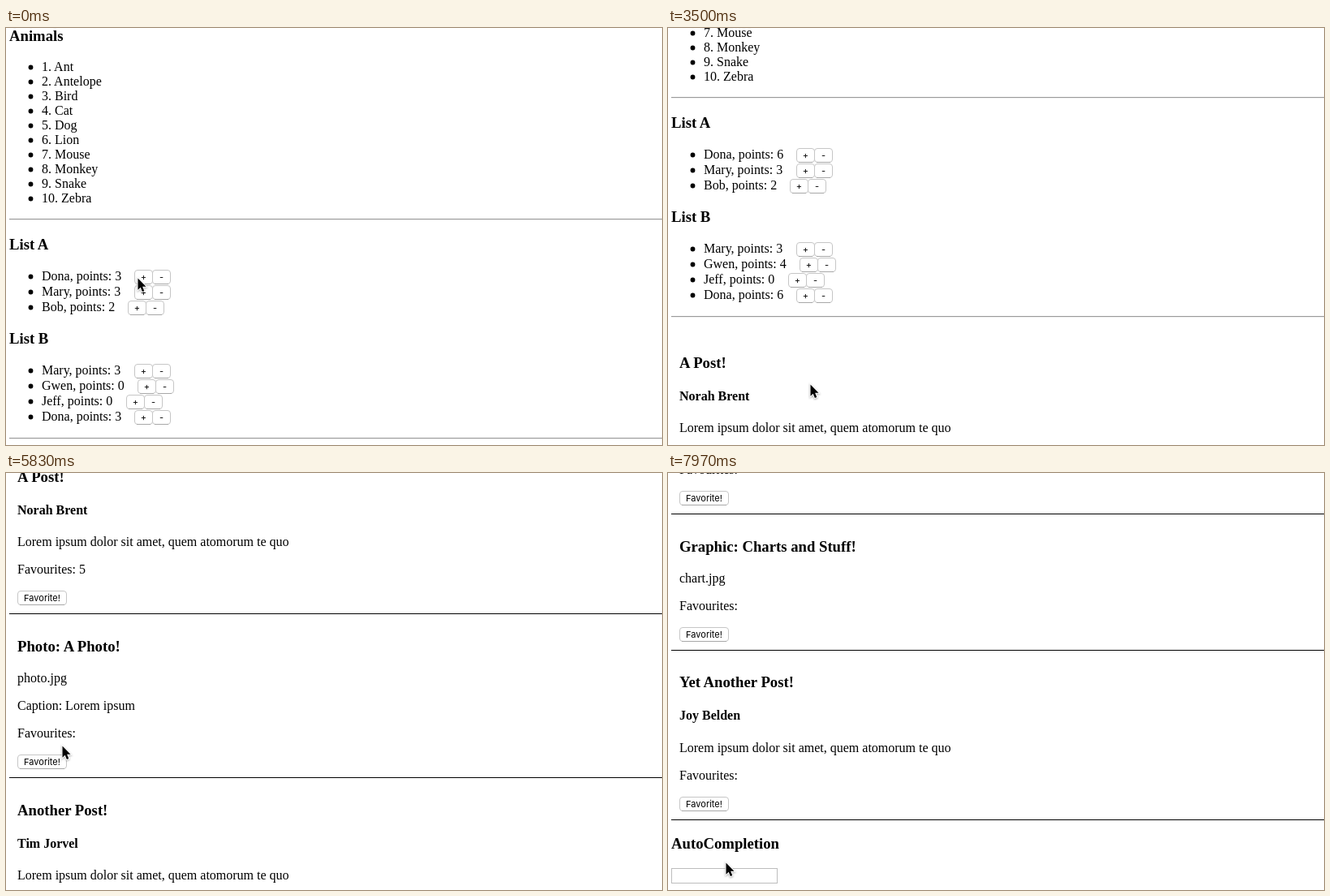
An HTML page that plays this animation: 808x514 px, repeating every 8000 ms.

```html
<!DOCTYPE html>
<html lang="en">
<head>
<meta charset="utf-8">
<title>Lists and posts</title>
<style>
html, body { margin: 0; height: 100%; overflow: hidden; background: #fff; }
svg { display: block; width: 808px; height: 514px; }
text { font: 16px "Liberation Serif", serif; white-space: pre; }
.h3 { font-size: 18.72px; font-weight: bold; }
.h4 { font-weight: bold; }
.btn rect { fill: #fff; stroke: #c6c6c6; }
.btn path { fill: none; stroke: #a8a8a8; }
.btn text { font: 11px Inter, sans-serif; text-anchor: middle; }
.down rect { fill: url(#blue); stroke: #2f7de8; }
.down path { stroke: #1a5fd0; }
.down text { fill: #fff; }
</style>
</head>
<body>
<svg viewBox="0 0 808 514">
  <defs>
    <linearGradient id="blue" x2="0" y2="1">
      <stop stop-color="#6bb2fa"/><stop offset="1" stop-color="#1a70f0"/>
    </linearGradient>
  </defs>
  <g id="page"></g>
  <path id="cursor" d="M0 0V14.2L3.2 11.2 5.4 16.4 7.8 15.4 5.6 10.3H10Z"
        stroke="#fff" stroke-width="2" paint-order="stroke"
        style="filter:drop-shadow(0 1px 1px #0005)"/>
</svg>
<script>
const page = document.getElementById('page');
const cursor = document.getElementById('cursor');

function add(tag, attrs, parent = page) {
  const el = document.createElementNS('http://www.w3.org/2000/svg', tag);
  for (const k in attrs) el.setAttribute(k, attrs[k]);
  return parent.appendChild(el);
}
function text(x, y, str, cls = '', parent = page) {
  const el = add('text', { x, y, class: cls }, parent);
  el.textContent = str;
  return el;
}
function line(y, fill) {
  add('rect', { x: 4, y, width: 804, height: 1, fill });
}
function rule(y) {
  line(y, '#9a9a9a');
  line(y + 1, '#eee');
}
function button(x, mid, w, label) {
  const g = add('g', { class: 'btn' });
  add('rect', { x: x + .5, y: mid - 8.5, width: w - 1, height: 17, rx: 3.5 }, g);
  add('path', { d: `M${x + 3} ${mid + 8.5}h${w - 6}` }, g);
  text(x + w / 2, mid + 4, label, '', g);
  return g;
}
function item(y, str) {
  add('circle', { cx: 30.5, cy: y - 4.5, r: 2.9 });
  return text(44, y, str);
}

// Counters: start value, clicks as [down, up] in ticks, and their elements
const counters = {
  Dona: { start: 3, clicks: [[1, 2], [6, 8], [9, 10]] },
  Mary: { start: 3 },
  Bob: { start: 2 },
  Gwen: { start: 0, clicks: [[19, 20], [23, 24], [26, 27], [30, 31]] },
  Jeff: { start: 0 },
  post: { start: 4, clicks: [[55, 56]] }
};
for (const c of Object.values(counters)) {
  c.clicks ??= [];
  c.labels = [];
}

function person(name, y, x) {
  const c = counters[name];
  c.labels.push([item(y, ''), name + ', points: ']);
  const plus = button(x, y - 4, 23, '+');
  button(x + 22, y - 4, 23, '-');
  c.button ??= plus;
}

function post(y, title, author, lines, counter) {
  text(14, Math.floor(y), title, 'h3');
  if (author) text(14, Math.floor(y += 40), author, 'h4');
  y += author ? 39.3 : 38.3;
  for (const s of lines) {
    text(14, Math.floor(y), s);
    y += 34;
  }
  const fav = text(14, Math.floor(y), 'Favourites:');
  const b = button(14, Math.floor(y + 30), 61, 'Favorite!');
  line(Math.floor(y + 49), '#000');
  if (counter) {
    counter.labels.push([fav, 'Favourites: ']);
    counter.button = b;
  }
}

text(4, 16, 'Animals', 'h3');
'Ant Antelope Bird Cat Dog Lion Mouse Monkey Snake Zebra'.split(' ')
  .forEach((s, i) => item(53 + 18 * i, `${i + 1}. ${s}`));
rule(235);
text(4, 273, 'List A', 'h3');
person('Dona', 311, 158);
person('Mary', 330, 158);
person('Bob', 349, 150);
text(4, 389, 'List B', 'h3');
person('Mary', 427, 158);
person('Gwen', 446, 162);
person('Jeff', 465, 148);
person('Dona', 484, 158);
rule(505);

const lorem = 'Lorem ipsum dolor sit amet, quem atomorum te quo';
post(569, 'A Post!', 'Norah Brent', [lorem], counters.post);
post(778, 'Photo: A Photo!', '', ['photo.jpg', 'Caption: Lorem ipsum']);
post(980, 'Another Post!', 'Tim Jorvel', [lorem]);
post(1189, 'Graphic: Charts and Stuff!', '', ['chart.jpg']);
post(1356.8, 'Yet Another Post!', 'Joy Belden', [lorem]);
text(4, 1555, 'AutoCompletion', 'h3');
add('rect', { x: 4.5, y: 1579.5, width: 130, height: 18, fill: '#fff', stroke: '#bdbdbd' });

// Tracks: [tick, values...]
const scroll = [[37, 0], [39, 150], [40, 150], [42, 290], [43, 290], [44, 332], [47, 380],
  [61, 380], [69, 736], [76, 1048], [78, 1048], [80, 1076], [83, 1092]];
const pointer = [[10, 162, 308], [14, 176, 441], [15, 176, 441], [17, 174, 441], [19, 174, 441],
  [20, 174, 440], [33, 174, 440], [35, 175, 439], [47, 175, 439], [52, 62, 341], [54, 64, 333],
  [56, 64, 333], [60, 69, 336], [86, 69, 336], [88, 85, 425], [89, 71, 480]];

function at(track, n) {
  const i = track.findIndex(k => k[0] > n);
  if (i < 0) return track.at(-1).slice(1);
  if (i === 0) return track[0].slice(1);
  const a = track[i - 1], b = track[i];
  const f = (n - a[0]) / (b[0] - a[0]);
  return a.slice(1).map((v, j) => Math.round(v + (b[j + 1] - v) * f));
}

// Screen updates come every 90 ms, with a little drift
function tickAt(t) {
  const drift = 10 * [1200, 5200, 7000, 7500].filter(d => t > d).length;
  return Math.floor((t + drift) / 90);
}

function draw(now) {
  const n = tickAt(now % 8000);
  for (const c of Object.values(counters)) {
    const value = c.start + c.clicks.filter(k => n >= k[1]).length;
    for (const [el, label] of c.labels) el.textContent = label + value;
    c.button.classList.toggle('down', c.clicks.some(k => n >= k[0] && n < k[1]));
  }
  const [x, y] = at(pointer, n);
  page.setAttribute('transform', `translate(0 ${-at(scroll, n)[0]})`);
  cursor.setAttribute('transform', `translate(${x + .5} ${y + .5})`);
}

let start;
function frame(now) {
  start ??= now;
  draw(now - start);
  requestAnimationFrame(frame);
}
draw(0);
requestAnimationFrame(frame);
</script>
</body>
</html>
```
